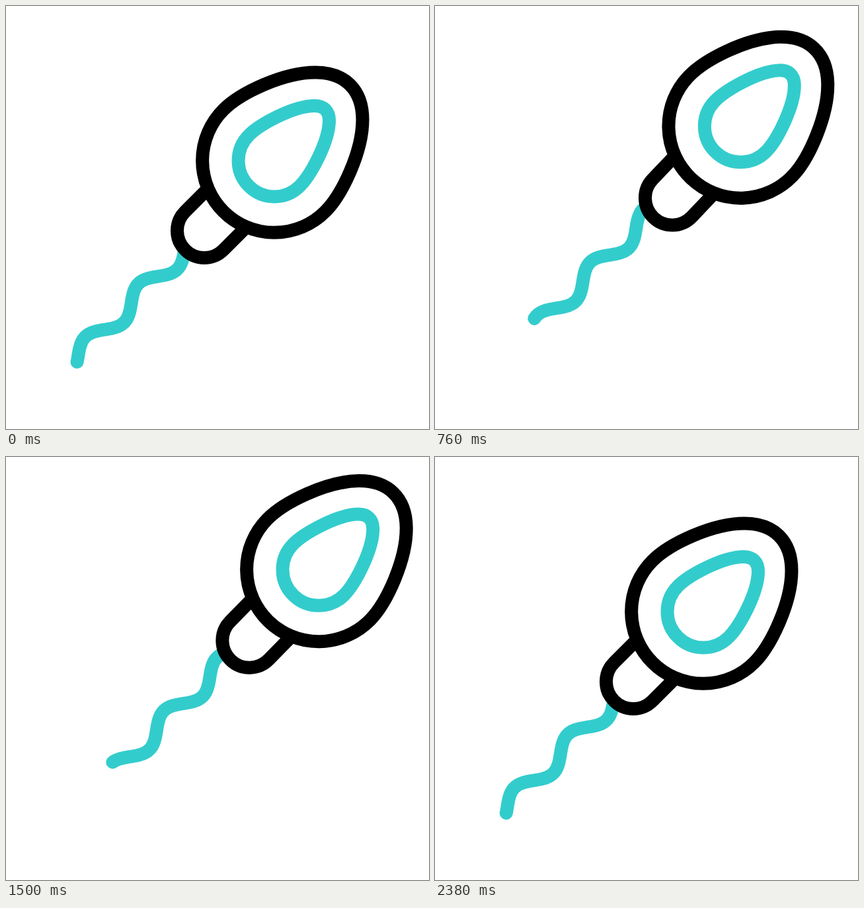
An HTML page for the animation above (2400 ms loop, 640 px wide and 640 px high).

```html
<!DOCTYPE html>
<html lang="en">
<head>
<meta charset="utf-8">
<title>Swimming cell</title>
<style>
  html, body { margin: 0; width: 100%; height: 100%; overflow: hidden; background: #fff; }
  svg { display: block; width: 100%; height: 100%; }
  path { fill: #fff; stroke: #000; stroke-width: 20; }
  .accent { stroke: #3cc; }
  #tail { fill: none; stroke-linecap: round; stroke-linejoin: round; }
</style>
</head>
<body>
<svg viewBox="0 0 640 640">
  <g id="swimmer">
    <path id="tail" class="accent"/>
    <g id="head">
      <path d="M303 279L271 311A41 41 0 0 0 329 369L361 337"/>
      <path d="M329 157C355 131 420 100.5 468 100.5C513 100.5 539.5 127 539.5 172C539.5 220 509 285 483 311A108.8 108.8 0 0 1 329 157Z"/>
      <path class="accent" d="M367.5 195.5C384 179 435 151 467 151C481 151 489 159 489 173C489 205 461 256 444.5 272.5A54.4 54.4 0 0 1 367.5 195.5Z"/>
    </g>
  </g>
</svg>
<script>
const LOOP = 2400;
const WAVELENGTH = 161;

// Keyframes are [time, value] pairs.
const travel = [[0, 0], [1208, 1], [2333, 0]];
const tilt = [[0, 0], [325, 4], [650, 0], [950, 4.6], [1270, 0], [1920, 2.5], [2333, 0]];
const wave = [[0, 0], [580, 314], [960, 420], [1280, 493], [1720, 586], [2060, 629], [2333, 644]];

const [swimmer, head, tail] = ['swimmer', 'head', 'tail'].map(id => document.getElementById(id));
const linear = p => p;
const smooth = p => p * p * (3 - 2 * p);

function valueAt(keys, t, ease) {
  const next = keys.findIndex(key => key[0] > t);
  if (next < 0) return keys[keys.length - 1][1];
  const [t0, a] = keys[next - 1], [t1, b] = keys[next];
  return a + (b - a) * ease((t - t0) / (t1 - t0));
}

// A sine wave along the diagonal: d is x - y, s is x + y.
function tailPath(shift) {
  const points = [];
  for (let d = -431; d <= -75; d += 3) {
    const s = 639 - 18.5 * Math.cos((d + 380 + shift) * 2 * Math.PI / WAVELENGTH);
    points.push(`${(s + d) / 2} ${(s - d) / 2}`);
  }
  return 'M' + points.join('L');
}

function draw(now) {
  const t = now % LOOP;
  const p = valueAt(travel, t, smooth);
  swimmer.setAttribute('transform', `translate(${79.8 * p} ${-77.2 * p})`);
  head.setAttribute('transform', `rotate(${-valueAt(tilt, t, smooth)} 454 186)`);
  tail.setAttribute('d', tailPath(valueAt(wave, t, linear)));
}

const start = performance.now();
function tick() {
  draw(performance.now() - start);
  requestAnimationFrame(tick);
}
tick();
</script>
</body>
</html>
```
